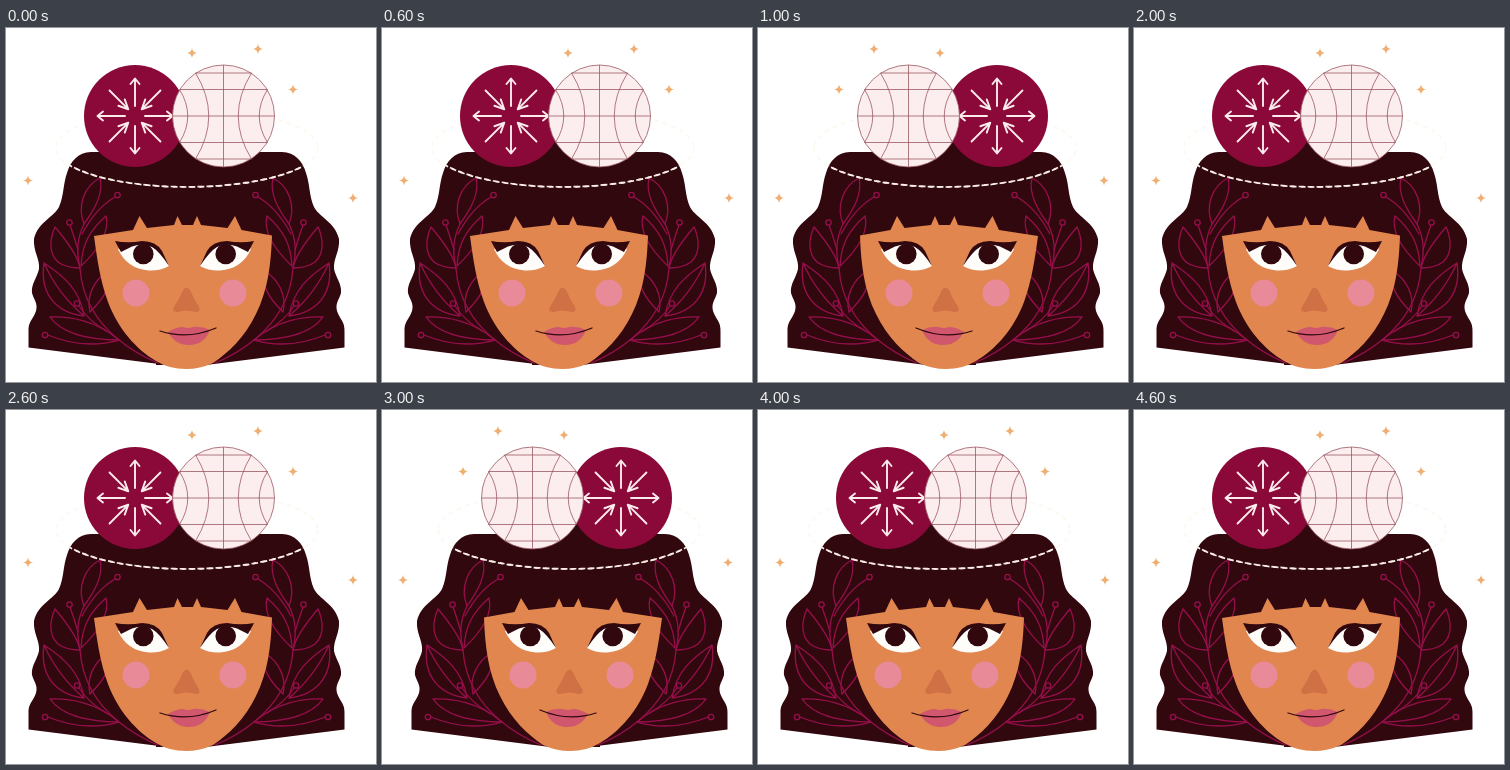
An HTML page that plays this animation: 370x354 px, repeating every 5 s.

```html
<!DOCTYPE html>
<html lang="en">
<head>
<meta charset="utf-8">
<title>Two sides</title>
<style>
html, body { margin: 0; width: 100%; height: 100%; overflow: hidden; background: #fff; }
svg { display: block; }
.vine { fill: none; stroke: #960f4b; stroke-width: 1.3; stroke-linecap: round; stroke-linejoin: round; }
.arrows { fill: none; stroke: #fcebed; stroke-width: 1.9; stroke-linecap: round; stroke-linejoin: round; }
.grid { fill: none; stroke: #94515a; stroke-width: .75; }
.dash { fill: none; stroke-width: 1.7; stroke-dasharray: 5 4; }
</style>
</head>
<body>
<svg width="370" height="354" viewBox="0 0 370 354">
  <defs>
    <path id="spark" fill="#efae72" d="M0-5Q.7-.7 5 0Q.7.7 0 5Q-.7.7-5 0Q-.7-.7 0-5Z"/>
    <path id="hair" fill="#32080f" d="M181 124H276C289 124 297 134 300 145C304 156 303 168 308 179C313 189 329 194 333 211C334 223 327 231 328 241C330 250 336 256 335 265C333 272 329 275 331 283C334 292 339 293 338.500 304V319.500L200 337H181Z"/>
    <g id="vine" class="vine">
      <path d="M94 150C98 166 88 182 78 196C70 212 71 226 74 240C76 268 88 292 113 312Q130 326 152 335"/>
      <path d="M94 150C78 158 71 178 78 196M109 169Q90 180 76 206M64 197Q68 208 72 222"/>
      <path d="M49 199C44 210 42 225 52 234Q60 240 74 240C72 228 60 212 49 199"/>
      <path d="M100 188C104 204 92 222 75 238C76 216 84 202 100 188"/>
      <path d="M38 235C34 262 46 284 78 288C74 262 58 248 38 235Q52 266 78 288"/>
      <path d="M102 243C88 252 80 268 84 284C98 270 106 258 102 243"/>
      <path d="M73 278Q82 292 100 303M42 307Q78 322 113 312"/>
      <path d="M44 289C62 288 90 292 113 312C84 312 56 306 44 289"/>
      <g fill="#32080f">
        <circle cx="111.500" cy="167" r="2.700"/>
        <circle cx="63.500" cy="194.500" r="2.700"/>
        <circle cx="71" cy="275.500" r="2.700"/>
        <circle cx="39" cy="307" r="2.700"/>
      </g>
    </g>
    <g id="eye">
      <path fill="#fffdfa" d="M112 221Q130 213 148 216Q157 225 163 238Q154 243 143 242.500Q121 241 112 221Z"/>
      <circle cx="137.300" cy="226" r="10.300" fill="#32080f"/>
      <path fill="#32080f" d="M109 213Q122 215.500 136 213Q150 213 156 223L163 238Q153 223 146 219Q136 215 126 218.500L115 224Q112 219 109 213Z"/>
      <circle cx="130" cy="265" r="13.500" fill="#e88a98"/>
    </g>
    <path id="out" d="M0-10V-37M-4.500-32L0-37.500L4.500-32"/>
    <path id="in" d="M0-36V-10M-4.500-19L0-9.500L4.500-19"/>
  </defs>

  <g id="pose">
    <g id="sparks"></g>

    <use href="#hair"/>
    <use href="#hair" transform="matrix(-1 0 0 1 361 0)"/>
    <path fill="#32080f" d="M150 125L173 104L196 125V337H150Z"/>
    <use href="#vine"/>
    <use href="#vine" transform="matrix(-1 0 0 1 361 0)"/>

    <path fill="#e0864e" d="M88 208L127 202L133.500 188L141 200L168 197L171.500 188L176 197H187L191 188L195 197L221.500 200L229 188L235.500 202L266 207.500C265 236 262 262 250 286C239 309 222 325 207 335Q194 341 180 341Q163 341 150 333C131 322 112 301 102 274C94 252 91 230 88 208Z"/>
    <use href="#eye"/>
    <use href="#eye" transform="matrix(-1 0 0 1 357 0)"/>
    <path fill="#cf7045" d="M177 262Q180.500 257 184 262Q188 271 193 279Q195 284 190 284Q180 281 172 284Q165 284 168 279Q174 270 177 262Z"/>
    <path fill="#d0576d" d="M162 304Q170 299 177 299Q182 301 187 299Q196 298 204 302Q198 317 183 317Q169 317 162 304Z"/>
    <path fill="none" stroke="#32080f" stroke-width="1.300" stroke-linecap="round" d="M154 303Q182 312 210 300"/>

    <ellipse class="dash" cx="181" cy="120" rx="131" ry="39" stroke="#fcf9ef"/>
    <path class="dash" stroke="#fcebe4" d="M68 139.500A131 39 0 0 0 297 138"/>

    <circle cx="129" cy="88" r="51" fill="#8a0938"/>
    <g id="arrows" class="arrows" transform="translate(129 88)"></g>

    <circle cx="217.500" cy="88" r="51" fill="#fcedef"/>
    <g class="grid">
      <circle cx="217.500" cy="88" r="51"/>
      <path d="M217.500 37V139M166.500 88H268.500M189.500 45H245.500M173.500 61.500H261.500M173.500 114.500H261.500M189.500 131H245.500"/>
      <path d="M189.500 45Q216 88 189.500 131M245.500 45Q219 88 245.500 131M173.500 61.500Q190 88 173.500 114.500M261.500 61.500Q245 88 261.500 114.500"/>
    </g>
  </g>
</svg>
<script>
const $ = id => document.getElementById(id);

$('sparks').innerHTML = [[186, 25], [252, 21], [287, 61.5], [22, 152.5], [347, 170]]
  .map(([x, y]) => `<use href="#spark" x="${x}" y="${y}"/>`).join('');

// Straight arrows point outwards, diagonal ones inwards.
$('arrows').innerHTML = Array.from({ length: 8 }, (_, i) =>
  `<use href="#${i % 2 ? 'in' : 'out'}" transform="rotate(${i * 45})"/>`).join('');

// The whole picture flips left to right every second.
function draw() {
  const step = Math.floor(performance.now() % 5000 / 1000);
  $('pose').setAttribute('transform', step % 2 ? 'matrix(-1 0 0 1 368 0)' : '');
  requestAnimationFrame(draw);
}
draw();
</script>
</body>
</html>
```
